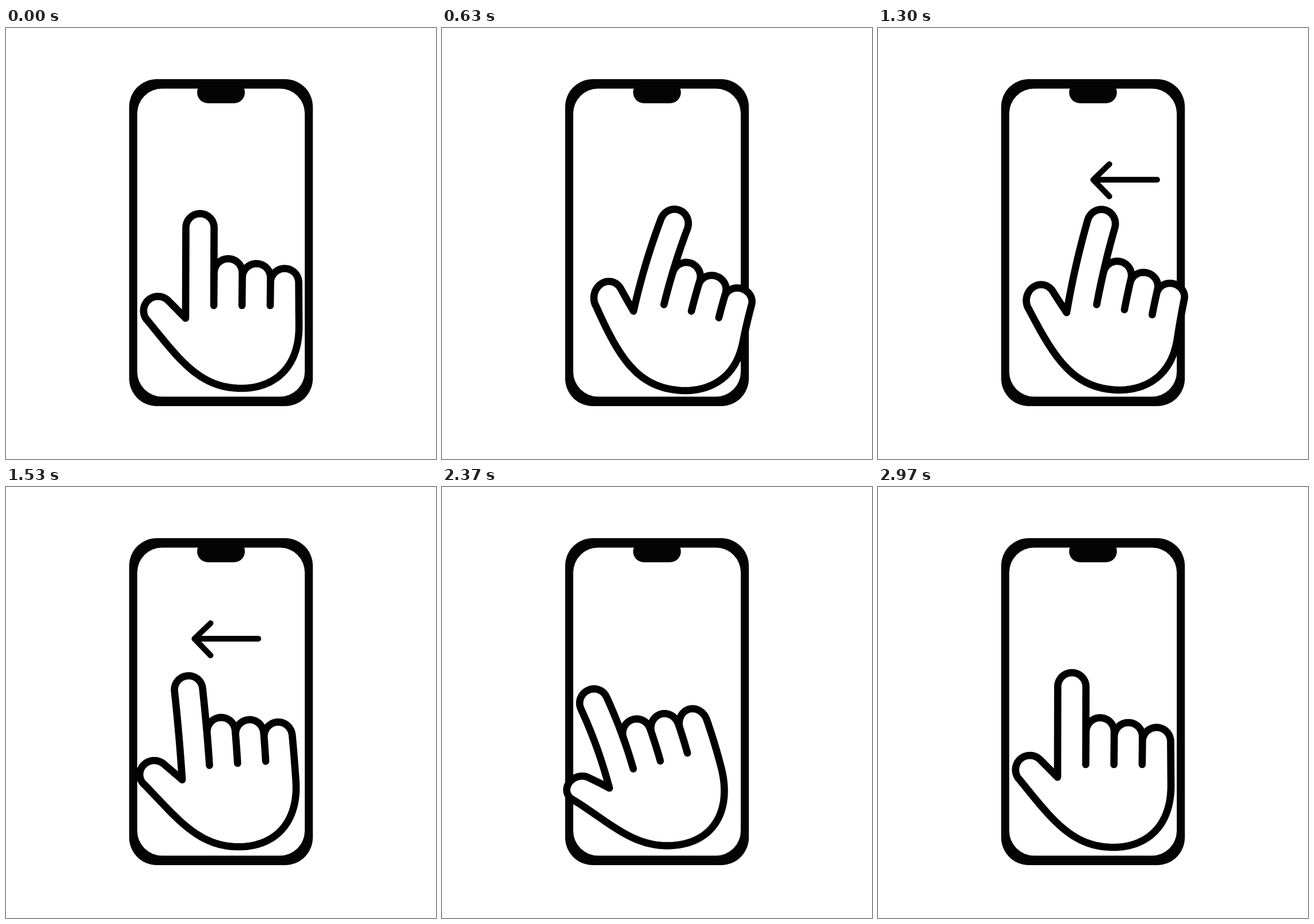
Recreate the animation shown at these times as an HTML page with a canvas. Size 747 by 750 pixels, loop 3.01 s.

```html
<!DOCTYPE html>
<html lang="en">
<head>
<meta charset="utf-8">
<title>Swipe left</title>
<style>
  html, body { margin: 0; width: 100%; height: 100%; overflow: hidden; background: #fff; }
  canvas { display: block; width: 747px; height: 750px; }
</style>
</head>
<body>
<canvas id="stage" width="747" height="750"></canvas>
<script>
const ctx = document.getElementById('stage').getContext('2d');
const LOOP = 3010;
const INK = '#000', FRAME = '#040404', PAPER = '#fff';
const ROOT = { x: 377, y: 627 };  // where the hand is anchored

const clamp = v => Math.min(1, Math.max(0, v));
const ramp = (t, from, to) => clamp((t - from) / (to - from));
const ease = (t, from, to) => (1 - Math.cos(Math.PI * ramp(t, from, to))) / 2;

// The upright hand as a closed chain of points.
function buildHand() {
  const pts = [];
  const sample = (n, f) => { for (let i = 0; i <= n; i++) pts.push(f(i / n)); };
  const line = (x, y) => {
    const [px, py] = pts[pts.length - 1];
    sample(12, k => [px + (x - px) * k, py + (y - py) * k]);
  };
  const arc = (cx, cy, r, from, to) => sample(28, k => {
    const a = (from + (to - from) * k) * Math.PI / 180;
    return [cx + r * Math.cos(a), cy + r * Math.sin(a)];
  });
  const curve = (x1, y1, x2, y2, x, y) => {
    const [px, py] = pts[pts.length - 1];
    const mix = (a, b, c, d, k) => {
      const m = 1 - k;
      return a * m * m * m + 3 * b * m * m * k + 3 * c * m * k * k + d * k * k * k;
    };
    sample(30, k => [mix(px, x1, x2, x, k), mix(py, y1, y2, y, k)]);
  };
  const finger = (cx, cy, r) => {
    line(cx - r, cy);
    arc(cx, cy, r, 180, 360);
  };

  pts.push([312, 505]);
  finger(337, 347.5, 24.5);
  for (let i = 0; i < 3; i++) {
    line(361 + 49 * i, 483);
    finger(386 + 49 * i, 426 + 8.5 * i, 24.5);
  }
  line(509, 520);
  curve(509, 592, 465, 627, 409, 627);
  curve(335, 627, 300, 575, 245, 508);
  arc(264, 492, 25, 140, 315);
  line(312, 505);
  return pts;
}
const hand = buildHand();

// Bends the hand like a beam: the angle grows with the height above the root.
function bend([x, y], amount) {
  const h = ROOT.y - y, side = x - ROOT.x;
  const base = amount * 0.163;
  const angle = base + amount * 0.00145 * h;
  const mid = (base + angle) / 2;
  return [
    ROOT.x + h * Math.sin(mid) + side * Math.cos(angle),
    ROOT.y - h * Math.cos(mid) + side * Math.sin(angle)
  ];
}

// Right, then across to the left, then back upright.
const swing = t => 0.9 * ease(t, 0, 1000) - 2 * ease(t, 1000, 2000) + 1.1 * ease(t, 2000, 3000);

function drawHand(t) {
  const amount = swing(t);
  ctx.beginPath();
  for (const p of hand) ctx.lineTo(...bend(p, amount));
  ctx.closePath();
  ctx.fillStyle = PAPER;
  ctx.fill();
  ctx.lineWidth = 12.6;
  ctx.stroke();
}

function box(x, y, w, h, r, color) {
  ctx.fillStyle = color;
  ctx.beginPath();
  ctx.roundRect(x, y, w, h, r);
  ctx.fill();
}

function drawPhone() {
  box(214, 89, 319, 569, 48, FRAME);
  box(228, 105.6, 291, 535.8, 43, PAPER);
  box(332, 93, 83, 38, 19, FRAME);
}

function drawArrow(t) {
  const alpha = ramp(t, 1000, 1300) * (1 - ramp(t, 1820, 2120));
  if (!alpha) return;
  const x = 401.3 - 149 * ease(t, 1000, 2067), y = 264;
  ctx.globalAlpha = alpha;
  ctx.lineWidth = 10;
  ctx.beginPath();
  ctx.moveTo(x + 28, y - 27);
  ctx.lineTo(x, y);
  ctx.lineTo(x + 28, y + 29);
  ctx.moveTo(x, y);
  ctx.lineTo(x + 111, y);
  ctx.stroke();
  ctx.globalAlpha = 1;
}

function draw(t) {
  ctx.fillStyle = PAPER;
  ctx.fillRect(0, 0, 747, 750);
  ctx.strokeStyle = INK;
  ctx.lineCap = ctx.lineJoin = 'round';
  drawPhone();
  drawArrow(t);
  drawHand(t);
}

const start = performance.now();
function tick() {
  draw((performance.now() - start) % LOOP);
  requestAnimationFrame(tick);
}
tick();
</script>
</body>
</html>
```
